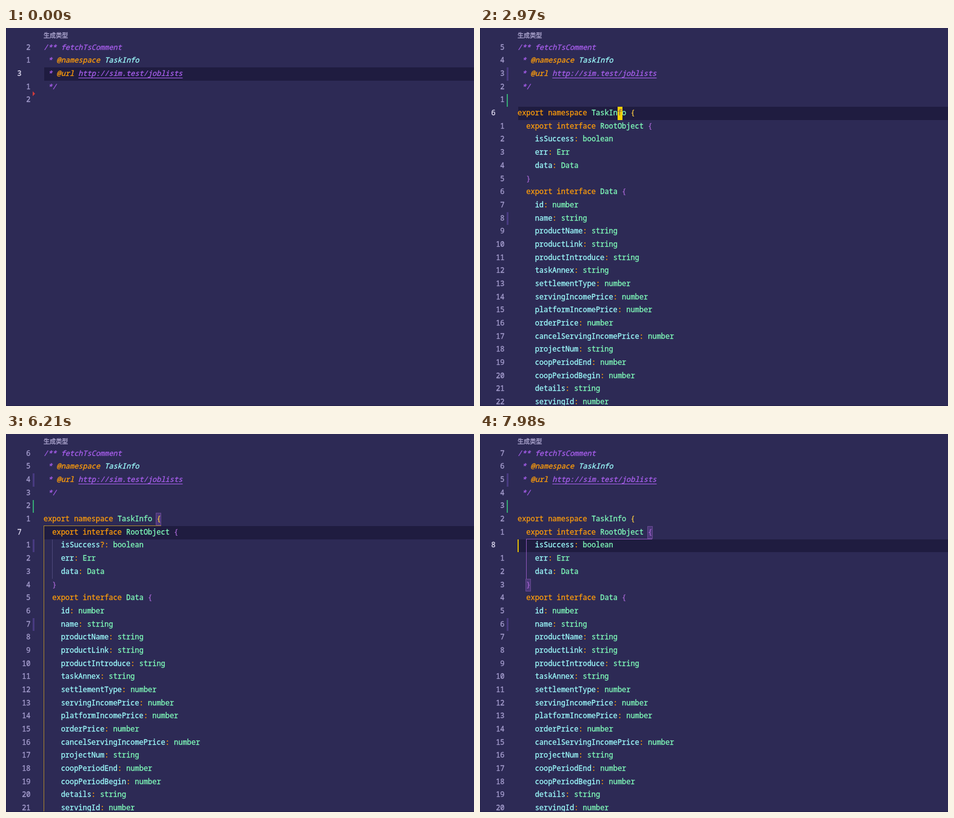
An HTML page with a canvas that plays this animation: 772x624 px, repeating every 8000 ms.

```html
<!DOCTYPE html>
<html lang="en">
<head>
<meta charset="utf-8">
<title>Editor: generating types</title>
<style>
  html, body { margin: 0; width: 100%; height: 100%; overflow: hidden; background: #2d2a55; }
  canvas { display: block; width: 772px; height: 624px; }
</style>
</head>
<body>
<canvas></canvas>
<script>
const WIDTH = 772, HEIGHT = 624, LOOP = 8000;
const LEFT = 62, TOP = 21.9, ROW = 21.67, CHAR = 7.17;
const CODE = '11.95px "Noto Sans Mono", "DejaVu Sans Mono", monospace';
const LENS = '10.08px Inter, "Noto Sans CJK SC", "Noto Sans CJK", sans-serif';
const C = {
  bg: '#2d2a55', active: '#1f1c40', edge: '#23204a', number: '#a79fd0', current: '#e4e0f5',
  comment: '#a95fee', keyword: '#ff9d0a', name: '#9effff', type: '#80ffbb',
  gold: '#f5c542', purple: '#a365cf', cursor: '#fad000', lens: '#b0a9d2',
  guideGold: '#a8842f', guidePurple: '#8a55b5', guideDim: '#4b4778',
  added: '#35a573', changed: '#483a80', removed: '#d13b3b',
  ours: '#2b8f0d', theirs: '#9b5422', label: 'rgba(170,160,215,.8)'
};

const URL_TEXT = 'http://sim.test/joblists';
const FIELDS = `id number,name string,productName string,productLink string,productIntroduce string,
taskAnnex string,settlementType number,servingIncomePrice number,platformIncomePrice number,
orderPrice number,cancelServingIncomePrice number,projectNum string,coopPeriodEnd number,
coopPeriodBegin number,details string,servingId number`.split(',').map(f => f.trim().replace(' ', ': '));

// [row, column] of the stray guide pieces seen beside the conflict block
const STRAYS = [[9, 16], [10, 4], [11, 11], [11, 14], [13, 9], [14, 11], [16, 9], [17, 7], [18, 16],
  [20, 5], [21, 3], [22, 0], [23, 10], [24, 15], [25, 7], [26, 12], [27, 12]];

const STEPS = [
  [0, { line: 2, col: 23, shape: 'block', on: false, guide: '', body: false, marked: false,
        optional: false, conflict: false, lens: false }],
  [60, { on: true }],
  [240, { body: true, guide: 'comment' }],
  [600, { marked: true, on: false }],
  [900, { on: true }],
  [1230, { on: false }],
  [1740, { on: true }],
  [2190, { on: false }],
  [2670, { on: true }],
  [2760, { line: 3, col: 2 }],
  [2850, { line: 4, col: 0 }],
  [2940, { line: 5, col: 23, guide: '' }],
  [3030, { line: 6, col: 23, guide: 'outer' }],
  [3120, { line: 7, col: 21, guide: 'inner' }],
  [3420, { col: 15 }],
  [3540, { col: 13 }],
  [3780, { shape: 'bar' }],
  [4200, { optional: true, col: 14 }],
  [4620, { line: 6 }],
  [4770, { guide: 'outer' }],
  [5070, { on: false }],
  [5610, { on: true }],
  [6060, { on: false }],
  [6300, { conflict: true }],
  [6450, { lens: true }],
  [6570, { on: true }],
  [6780, { on: false }],
  [6990, { on: true }],
  [7440, { on: false }],
  [7740, { conflict: false, lens: false, optional: false, line: 7, col: 0, on: true, guide: 'inner' }]
];

const canvas = document.querySelector('canvas');
const ctx = canvas.getContext('2d');
const ratio = window.devicePixelRatio || 1;
canvas.width = WIDTH * ratio;
canvas.height = HEIGHT * ratio;
ctx.scale(ratio, ratio);

const xAt = col => LEFT + col * CHAR;
const yAt = row => TOP + row * ROW;

function rect(x, y, w, h, color) {
  ctx.fillStyle = color;
  ctx.fillRect(x, y, w, h);
}

// A box whose top and bottom sit on whole pixels
function bar(x, y, w, h, color) {
  rect(x, Math.round(y), w, Math.round(y + h) - Math.round(y), color);
}

// The hairline stroke gives the text a medium weight
function write(text, x, row, color, style = '400', font = CODE) {
  const baseline = yAt(row) + 13.9;
  ctx.font = `${style} ${font}`;
  ctx.fillStyle = ctx.strokeStyle = color;
  ctx.lineWidth = 0.3;
  ctx.lineJoin = 'round';
  ctx.fillText(text, x, baseline);
  ctx.strokeText(text, x, baseline);
}

function squiggle(x, y, width, color) {
  ctx.beginPath();
  for (let i = 0; i <= width; i += 2) ctx.lineTo(x + i, y + (i % 4 ? 1.5 : 0));
  ctx.strokeStyle = color;
  ctx.lineWidth = 1;
  ctx.stroke();
}

// Rows of the document: text, gutter mark and optional special kind
function buildRows(s) {
  const code = (text, mark) => ({ text, mark });
  const rows = [
    { kind: 'comment', parts: [[0, '/** fetchTsComment', C.comment]] },
    { kind: 'comment', parts: [[1, '*', C.comment], [3, '@namespace', C.keyword], [14, 'TaskInfo', C.name]] },
    { kind: 'comment', mark: 'changed',
      parts: [[1, '*', C.comment], [3, '@url', C.keyword], [8, URL_TEXT, C.comment]] },
    { kind: 'comment', parts: [[1, '*/', C.comment]] },
    code('', 'added')
  ];
  if (!s.body) return rows;

  rows.push(code('export namespace TaskInfo {'), code('  export interface RootObject {'));
  if (s.lens) rows.push({ kind: 'lens' });
  if (s.conflict) {
    rows.push(
      { kind: 'ours', label: '(Current Change)', mark: 'added', fill: C.ours },
      { ...code('    isSuccess?: boolean', 'added'), fill: C.ours },
      { kind: 'split', mark: 'added' },
      { ...code('    isSuccess: boolean'), fill: C.theirs },
      { kind: 'theirs', label: '(Incoming Change)', mark: 'added', fill: C.theirs });
  } else {
    rows.push(s.optional ? code('    isSuccess?: boolean', 'changed') : code('    isSuccess: boolean'));
  }
  rows.push(code('    err: Err'), code('    data: Data'), code('  }'), code('  export interface Data {'));
  for (const f of FIELDS) rows.push(code('    ' + f, f.startsWith('name') ? 'changed' : ''));
  return rows;
}

function drawCode(text, row) {
  let typeNext = false;
  for (const { 0: token, index } of text.matchAll(/\w+|\S/g)) {
    let color = typeNext ? C.type : C.name;
    if (/^(export|namespace|interface)$/.test(token)) {
      color = C.keyword;
      typeNext = true;
    } else if (/[{}]/.test(token)) {
      color = text.startsWith(' ') ? C.purple : C.gold;
    } else if (/[:?]/.test(token)) {
      color = C.keyword;
      typeNext = true;
    }
    write(token, xAt(index), row, color);
  }
}

function drawRow(r, row) {
  const y = yAt(row);
  if (r.fill) bar(LEFT, y, WIDTH - LEFT, ROW, r.fill);

  if (r.kind === 'comment') {
    for (const [col, text, color] of r.parts) {
      write(text, xAt(col), row, color, 'italic 400');
      if (text === URL_TEXT) rect(xAt(col), Math.round(y + 16.5), text.length * CHAR, 1, color);
    }
  } else if (r.kind === 'lens') {
    write('Accept Current Change | Accept Incoming Change | Accept Both Changes | Compare Changes',
      LEFT, row, C.lens, '400', LENS);
  } else if (r.kind === 'split') {
    rect(LEFT + 1, Math.round(y + 8.5), 48, 1, '#e8fbff');
    rect(LEFT + 1, Math.round(y + 11.5), 48, 1, '#e8fbff');
    squiggle(LEFT, y + 18, 49, '#b8433f');
  } else if (r.label) {
    write((r.kind === 'ours' ? '<' : '>').repeat(7), LEFT, row, '#e8fbff', '700');
    write(r.label, xAt(8), row, C.label);
    if (r.kind === 'ours') squiggle(LEFT, y + 19.5, 43, '#7a6a1c');
  } else {
    drawCode(r.text, row);
  }
}

function drawGutter(rows, s) {
  const numbered = rows.filter(r => r.kind !== 'lens');
  rows.forEach((r, row) => {
    if (r.kind === 'lens') return;
    const index = numbered.indexOf(r);
    const current = index === s.line;
    ctx.textAlign = current ? 'left' : 'right';
    write(current ? index + 1 : Math.abs(index - s.line), current ? 18.5 : 40.5, row,
      current ? C.current : C.number);
    ctx.textAlign = 'left';
    if (s.marked && r.mark) bar(44, yAt(row), r.mark === 'added' ? 2 : 3, ROW, C[r.mark]);
  });
  if (!s.marked) {
    ctx.fillStyle = C.removed;
    ctx.beginPath();
    ctx.moveTo(44, 104.5);
    ctx.lineTo(48, 108.5);
    ctx.lineTo(44, 112.5);
    ctx.fill();
  }
}

function bracketBox(col, row) {
  const x = Math.round(xAt(col)), y = Math.round(yAt(row));
  rect(x - 1, y, 9, 21, '#4b3779');
  ctx.strokeStyle = '#66498f';
  ctx.lineWidth = 1;
  ctx.strokeRect(x - 0.5, y + 0.5, 8, 20);
}

function verticalGuide(col, from, to, color) {
  bar(Math.round(xAt(col)), yAt(from), 1, (to - from) * ROW, color);
}

function horizontalGuide(from, to, row, color) {
  rect(Math.round(xAt(from)), Math.round(yAt(row)) - 1, Math.round((to - from) * CHAR), 1, color);
}

function drawGuides(s) {
  if (s.guide === 'comment') verticalGuide(0, 1, 5, C.guideDim);
  if (s.guide === 'inner') {
    bracketBox(30, 6);
    bracketBox(2, 10);
    horizontalGuide(2, 31, 7, C.guidePurple);
    verticalGuide(2, 7, 10, C.guidePurple);
  }
  if (s.guide === 'outer') {
    bracketBox(26, 5);
    horizontalGuide(0, 27, 6, C.guideGold);
    verticalGuide(0, 6, s.conflict ? 7 : 28, C.guideGold);
    if (!s.conflict) verticalGuide(2, 7, 10, C.guideDim);
  }
}

function drawCursor(s, rows) {
  if (!s.on) return;
  const x = xAt(s.col), y = yAt(s.line);
  if (s.shape === 'bar') return bar(x, y, 1.7, ROW, C.cursor);
  bar(Math.round(x), y, 8, ROW, C.cursor);
  const r = rows[s.line];
  let char = r.text ? r.text[s.col] : '';
  for (const [col, text] of r.parts || []) char = text[s.col - col] || char;
  if (char) write(char, x, s.line, '#8a6a55', r.parts ? 'italic 400' : '400');
}

function draw(time) {
  const s = Object.assign({}, ...STEPS.filter(([at]) => at <= time).map(([, change]) => change));
  const rows = buildRows(s);
  rect(0, 0, WIDTH, HEIGHT, C.bg);
  bar(LEFT + 1, yAt(s.line), WIDTH, ROW, C.active);
  write('生成类型', LEFT, -0.92, C.lens, '400', LENS);
  drawGuides(s);
  rows.forEach(drawRow);
  if (s.lens) STRAYS.forEach(([row, col]) => verticalGuide(col, row, row + 1, C.guideGold));
  drawGutter(rows, s);
  drawCursor(s, rows);
  rect(0, 0, 1, HEIGHT, C.edge);
  rect(0, HEIGHT - 1, WIDTH, 1, C.edge);
}

const start = performance.now();
function tick() {
  draw((performance.now() - start) % LOOP);
  requestAnimationFrame(tick);
}
tick();
</script>
</body>
</html>
```
